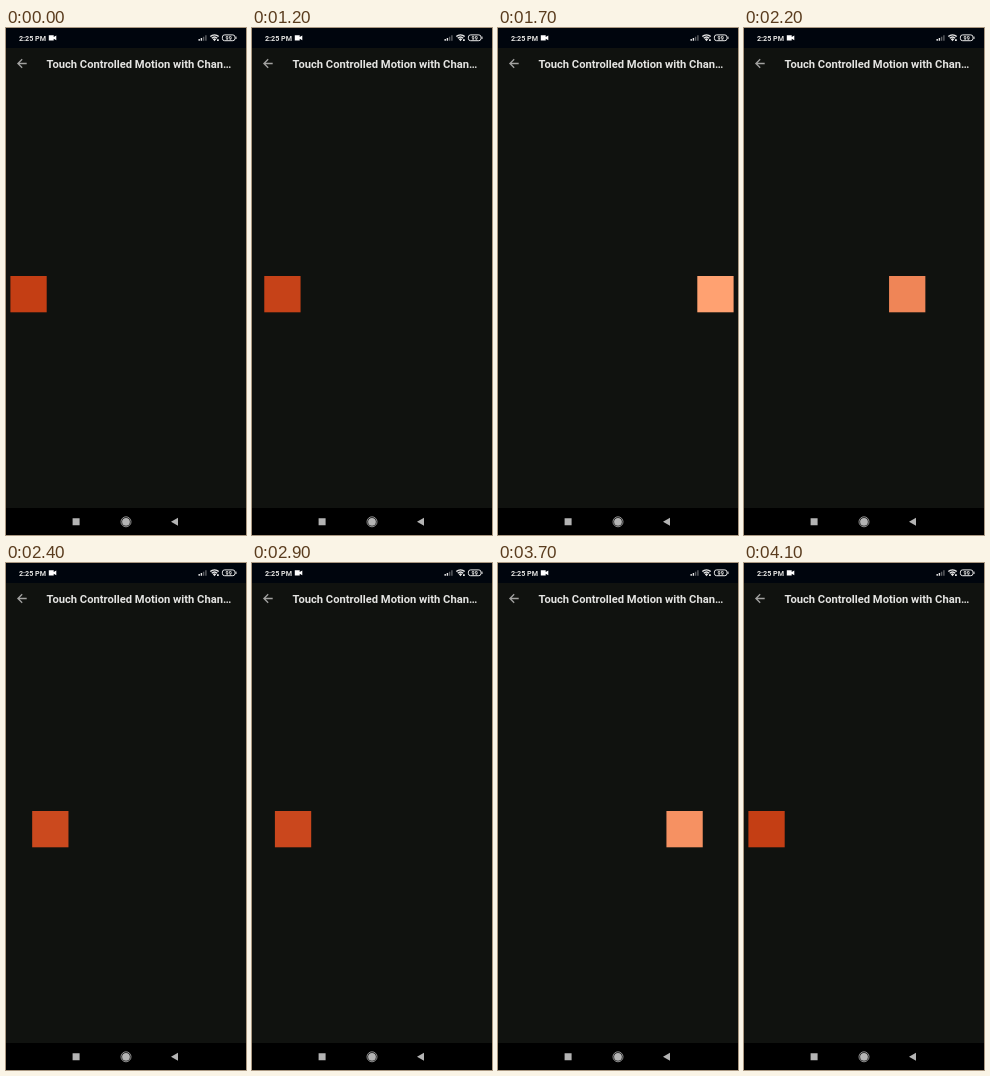
These frames come from a looping animation (240 px wide and 507 px high, 4.2 s). An HTML page:

```html
<!DOCTYPE html>
<html lang="en">
<head>
<meta charset="utf-8">
<title>Touch controlled motion</title>
<style>
  html, body { margin: 0; width: 100%; height: 100%; overflow: hidden; background: #10120f; }
  svg { display: block; width: 100%; height: 100%; }
  text { font-family: Roboto, sans-serif; font-weight: 700; fill: #e4e4e2; }
</style>
</head>
<body>
<svg viewBox="0 0 240 507">
  <rect width="240" height="507" fill="#10120f"/>
  <rect width="240" height="20" fill="#00050d"/>
  <rect y="480" width="240" height="27"/>

  <!-- Status bar -->
  <text x="12.9" y="12.6" font-size="7.2" fill="#fff">2:25 PM</text>
  <path d="M42.8 7.2h4.9v1.7l2.6-1.5v4.8l-2.6-1.5v1.7h-4.9z" fill="#fff"/>
  <g fill="#e8e8e8">
    <path d="M192.5 11h1.4v1.7h-1.4zM194.7 10h1.4v2.7h-1.4z"/>
    <path d="M196.9 8.7h1.4v4h-1.4zM199.2 7.2h1.4v5.5h-1.4z" opacity=".4"/>
    <path d="M208.5 13.2l-1.7-2a2.4 2.4 0 0 1 3.4 0z"/>
    <path d="M211 11.3h1.8v1.8H211z"/>
  </g>
  <g fill="none" stroke="#e8e8e8" stroke-width="1.4">
    <path d="M204.3 8.6a6 6 0 0 1 8.4 0M205.8 10.3a3.9 3.9 0 0 1 5.4 0"/>
    <rect x="216.4" y="6.9" width="12.6" height="5.8" rx="2.2" stroke-width="1"/>
    <path d="M230 8.6v2.4" stroke-width="1"/>
  </g>
  <text x="222.7" y="11.8" font-size="5.4" text-anchor="middle">99</text>

  <!-- Header -->
  <path d="M20.7 35.5h-8.7M16.2 31.2l-4.3 4.3 4.3 4.3" fill="none" stroke="#a2a2a0" stroke-width="1.3"/>
  <text x="40.6" y="40.1" font-size="11.2">Touch Controlled Motion with Chan…</text>

  <rect id="box" y="248" width="36.3" height="36.3"/>

  <!-- Navigation bar -->
  <g fill="#b4b4b4">
    <path d="M66.6 490.2h7v7h-7zM172 489.7v8l-7-4z"/>
    <circle cx="120" cy="493.8" r="3.9"/>
    <circle cx="120" cy="493.8" r="5" fill="none" stroke="#b4b4b4" stroke-width=".8"/>
  </g>
</svg>
<script>
  const LOOP = 4200, STEP = 100;
  const LEFT = 4.4, RIGHT = 199.3;
  const DARK = [196, 62, 20], LIGHT = [255, 161, 113];
  // Alternating moves to the right and to the left.
  const MOVES = [
    { start: 1129, duration: 500 },
    { start: 2009, duration: 512 },
    { start: 2800, duration: 459 },
    { start: 3579, duration: 430 }
  ];
  const box = document.getElementById('box');

  const mix = (a, b, p) => a + (b - a) * p;
  const clamp = v => Math.min(1, Math.max(0, v));
  const easeInOut = t => t < 0.5 ? 2 * t * t : 1 - 2 * (1 - t) ** 2;

  function progressAt(time) {
    return MOVES.reduce((sum, { start, duration }, i) =>
      sum + (i % 2 ? -1 : 1) * easeInOut(clamp((time - start) / duration)), 0);
  }

  function draw(now) {
    const time = Math.floor((now % LOOP) / STEP) * STEP;
    const p = progressAt(time);
    box.setAttribute('x', mix(LEFT, RIGHT, p));
    box.setAttribute('fill', `rgb(${DARK.map((c, i) => Math.round(mix(c, LIGHT[i], p)))})`);
  }

  const origin = performance.now();
  function tick() {
    draw(performance.now() - origin);
    requestAnimationFrame(tick);
  }
  tick();
</script>
</body>
</html>
```
